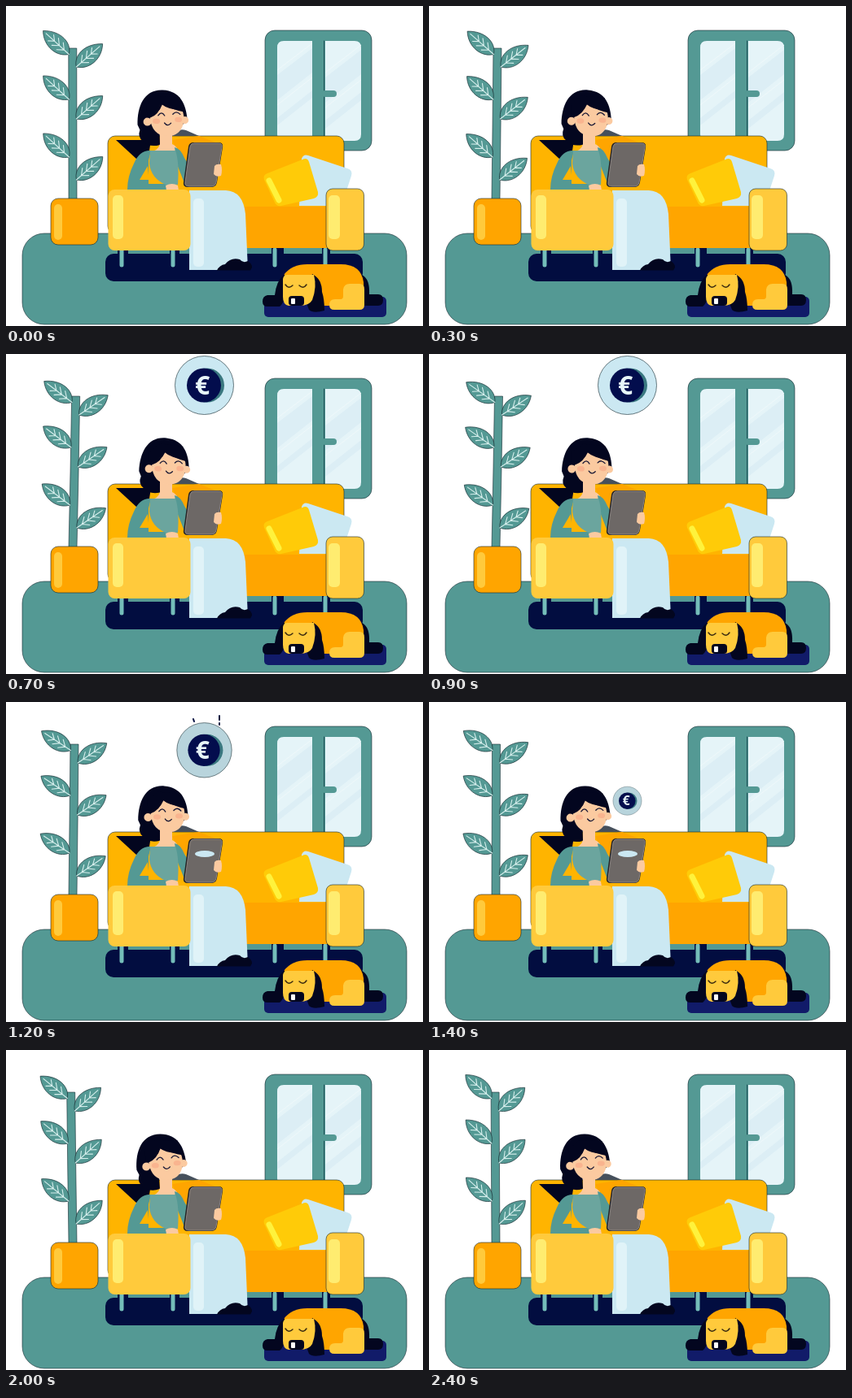
Recreate the animation shown at these times as an HTML page. Size 512 px wide and 394 px high, loop 2500 ms.

```html
<!DOCTYPE html>
<html lang="en">
<head>
<meta charset="utf-8">
<title>Sofa evening</title>
<style>
  html, body { margin: 0; width: 100%; height: 100%; overflow: hidden; background: #fff; }
  svg { display: block; width: 100vw; height: 100vh; }
  .teal { fill: #549994; }
  .navy { fill: #020d40; }
  .hair { fill: #03061f; }
  .ice { fill: #cbe8f2; }
  .skin { fill: #fbcaa0; }
  .amber { fill: #ffa500; }
  .gold { fill: #ffca3c; }
  .edge { stroke: #12282e; stroke-width: .6; }
  .line { fill: none; stroke-linecap: round; stroke-linejoin: round; }
</style>
</head>
<body>
<svg viewBox="0 0 512 394" xmlns="http://www.w3.org/2000/svg">
  <defs>
    <clipPath id="panes"><path d="M341 43H376V166H341Q333 166 333 158V51Q333 43 341 43ZM392 43H428Q436 43 436 51V158Q436 166 428 166H392Z"/></clipPath>
    <g id="leafShape">
      <path class="teal edge" d="M0 0C7 -13 27 -15 43 0C30 14 9 13 0 0Z"/>
      <path class="line" stroke="#d5eeec" stroke-width="1.1" d="M0 0H38M8 0L15 -6M8 0L15 6M16 0L23 -6M16 0L23 6M24 0L30 -5M24 0L30 5"/>
    </g>
  </defs>

  <rect class="teal edge" x="20" y="280" width="472" height="112" rx="27"/>

  <!-- window -->
  <rect class="teal edge" x="318" y="30" width="131" height="148" rx="12"/>
  <g clip-path="url(#panes)">
    <rect x="333" y="43" width="103" height="123" fill="#e5f4f8"/>
    <path fill="#dceef5" d="M333 85L376 52V82L333 116ZM333 138L376 104V113L333 147ZM392 88L436 54V84L392 119ZM392 141L436 106V116L392 151Z"/>
    <path class="line" stroke="#eff8fa" d="M333 79L376 46M333 122L376 88M392 82L436 48M392 125L436 91"/>
  </g>
  <path class="line" stroke="#1f5058" d="M390.5 43V160"/>
  <rect class="teal" x="388" y="104" width="18" height="8" rx="4"/>

  <!-- plant -->
  <path id="stalk" class="teal edge"/>
  <g id="leaves"></g>
  <rect class="amber edge" x="55" y="237" width="58" height="57" rx="9"/>
  <rect class="gold" x="59" y="244" width="10" height="44" rx="5"/>

  <!-- sofa -->
  <rect class="navy" x="122" y="305" width="316" height="34" rx="10"/>
  <path class="navy" d="M137 297H150V306H137ZM201 297H213V306H201ZM326 297H341V306H326ZM388 297H398V306H388Z"/>
  <path class="line" stroke="#74bdb9" stroke-width="5" d="M142 300V319M205 300V319M330 300V319M392 300V319"/>
  <rect class="edge" x="125" y="160" width="290" height="120" rx="9" fill="#ffb400"/>
  <path class="amber" d="M222 247H398V298H222Z"/>
  <path class="ice" d="M371 184L419 200Q426 202 424 209L412 246H360L363 188Q365 182 371 184Z"/>
  <path fill="#ffcb08" d="M321 206L364 189Q370 186 372 192L383 229Q384 235 378 237L338 246Q332 247 330 242L317 214Q315 208 321 206Z"/>
  <path class="line" stroke="#fff23c" stroke-width="7" d="M323 215L335 239"/>
  <rect class="gold edge" x="393" y="225" width="46.500" height="76" rx="8"/>
  <rect x="396" y="233" width="14" height="54" rx="5" fill="#ffec70"/>

  <!-- woman -->
  <path class="hair" d="M135 165H178L176 178L161 189Z"/>
  <path class="amber" d="M204 165L237 160L262 170L226 178L222 190L208 175Z"/>
  <path d="M202 160Q211 150 221 153L237 160Z" fill="#46505c"/>
  <g id="backHair"><path class="hair" d="M161 147C160 124 168 103 191 103.500C213 104 220 121 222 139L212 151L188 150L189 171Q176 175 168 167Q161 162 164 153Z"/></g>
  <path class="skin" d="M189 152H204V170Q210 172 211 180L195 188L176 180Q187 178 189 170Z"/>
  <path class="teal" d="M178 178Q164 177 157 194Q149 210 149 226H200L198 219H175V190ZM207 174Q214 175 219 187L227 200L219 218L210 195Z"/>
  <path fill="#6ba59e" d="M177 178H208Q213 192 211 220H196Q178 212 176 194Z"/>
  <path fill="#ffb400" d="M174 197L164 214H175.500Z"/>
  <path class="skin" d="M196 221Q204 217 211 221L212 227H197Z"/>
  <g id="head">
    <circle class="skin" cx="173" cy="143" r="5"/>
    <circle class="skin" cx="219" cy="140" r="4.500"/>
    <path class="skin" d="M176 138Q187 134 190 121Q199 128 215 127Q219 134 217 145Q213 160 198 160Q179 160 176 138Z"/>
    <path class="hair" d="M173 138Q187 133 191 121Q205 128 218 130L212 112L184 111L171 122Z"/>
    <ellipse cx="184" cy="142" rx="4.500" ry="3.200" fill="#f9b48f"/>
    <ellipse cx="211" cy="139.500" rx="4.500" ry="3.200" fill="#f9b48f"/>
    <path class="line" stroke="#161634" stroke-width="1.3" d="M186 135Q190 129 194 135M204 133Q208 128 213 133M194 144Q198 149 202 144"/>
  </g>
  <path d="M230 168H261Q267 168 266 174L259 217Q258 223 252 223H223Q217 223 218 217L224 173Q225 168 230 168Z" fill="#252426"/>
  <path d="M231 169H261Q266 169 265 174L258 217Q257 222 252 222H225Q219 222 220 217L226 173Q227 169 231 169Z" fill="#6d6866" stroke="#8c8583"/>
  <ellipse id="slot" cx="244" cy="187" ry="4" class="ice"/>
  <path class="skin" d="M256 197Q258 194 264 195Q266 202 264 209Q258 211 255 207Z"/>
  <path class="ice" d="M225 227H270Q291 228 294 256L297 325H225Z"/>
  <rect x="230" y="237" width="13" height="84" rx="5" fill="#e0f3f8"/>
  <path class="hair" d="M259 325.500Q262 319 269 318Q276 309 287 312Q291 317 297 314Q302 317 302 322L300 325.500Z"/>
  <rect class="gold" x="125.500" y="226" width="101" height="75" rx="8"/>
  <rect x="131" y="233" width="13" height="54" rx="5" fill="#ffec70"/>

  <!-- dog -->
  <rect x="317" y="358" width="150" height="25" rx="5" fill="#111b69"/>
  <path class="hair" d="M437 331Q447 336 446 355H457Q463 355 463 362Q463 369 457 369H438Z"/>
  <path class="amber" d="M341 331Q351 318 370 318H411Q436 318 439 340L440 369H376Z"/>
  <path class="hair" d="M342 330Q332 338 330 356H321Q315 357 315 364Q315 370 321 370H336Q341 366 342 358ZM376 330Q388 336 388 352Q391 361 391 375Q377 379 372 374L368 363Z"/>
  <path class="gold" d="M345 331H378Q382 346 376 362Q372 369 361 369H347Q340 368 340 358V336Q341 331 345 331Z"/>
  <path class="gold" d="M414 349Q415 342 422 342H434Q440 342 440 349V368Q440 374 434 374H403Q397 374 397 368Q397 361 404 361H411Q414 361 414 357Z"/>
  <rect class="hair" x="347" y="357" width="19" height="12" rx="4"/>
  <rect x="350" y="360" width="5" height="7" rx="1" fill="#fff"/>
  <path class="line" stroke="#3a2a10" stroke-width="1.500" d="M343 343Q347 349 352 344M360 344Q365 349 369 343"/>

  <!-- coin -->
  <path id="ticks" class="line" stroke="#020d40" stroke-width="2" d="M230 21L231 24M262 17V22M262 26V28"/>
  <g id="coin">
    <circle id="halo" class="edge"/>
    <g id="disc">
      <circle cx="3.500" r="21" fill="#3a7880"/>
      <circle r="21" cx="-.5" fill="#030d4d"/>
      <text x="-2.500" y="11.500" text-anchor="middle" font-family="'Open Sans', Lato, sans-serif" font-weight="700" font-size="32" fill="#e8f6f9">€</text>
    </g>
  </g>
</svg>
<script>
const LOOP = 2500, STEP = 100;
const $ = id => document.getElementById(id);
const set = (node, attrs) => { for (const k in attrs) node.setAttribute(k, attrs[k]); };
const show = (node, on) => set(node, { visibility: on ? "visible" : "hidden" });

// Progress from 0 to 1 between two times.
const ramp = (t, from, to) => Math.min(1, Math.max(0, (t - from) / (to - from)));
const smooth = u => u * u * (3 - 2 * u);
// One swing per loop, 1 at the peak time.
const swing = (t, peak) => Math.cos(2 * Math.PI * (t - peak) / LOOP);

function makeLeaf(side, y) {
  const node = document.createElementNS("http://www.w3.org/2000/svg", "use");
  set(node, { href: "#leafShape" });
  $("leaves").append(node);
  return { node, side, y };
}
const leaves = [
  ...[59.5, 115, 186].map(y => makeLeaf(-1, y)),
  ...[75, 139, 214].map(y => makeLeaf(1, y))
];

function drawPlant(t) {
  const lean = .7 + 3 * swing(t, 750);
  const bend = y => lean * (237 - y) / 185;
  $("stalk").setAttribute("d",
    `M77 238Q${77 + lean * .6} 145 ${77 + lean} 52H${87 + lean}Q${87 + lean * .6} 145 87 238Z`);
  for (const { node, side, y } of leaves) {
    const droop = 4.5 * swing(t, side < 0 ? 1250 : 950);
    set(node, {
      transform: `translate(${82 + side * 4.5 + bend(y)} ${y}) scale(${side} 1) rotate(${droop - 38})`
    });
  }
}

function drawCoin(t) {
  const pop = 1 - (1 - ramp(t, 300, 700)) ** 2;
  const fall = ramp(t, 1000, 1500);
  const shrink = 1 - fall ** 3;
  const dim = ramp(t, 1000, 1200);
  show($("coin"), pop > 0 && fall < 1);
  set($("coin"), { transform: `translate(243.5 ${38.5 + 130 * fall ** 2}) scale(${shrink})` });
  set($("halo"), {
    r: 36 * smooth(ramp(t, 400, 600)),
    fill: `rgb(${203 - 19 * dim} ${232 - 20 * dim} ${242 - 22 * dim})`
  });
  set($("disc"), { transform: `scale(${pop})` });
  show($("ticks"), t >= 1100 && t < 1300);

  const open = ramp(t, 1000, 1200) - ramp(t, 1600, 1800);
  show($("slot"), open > 0);
  set($("slot"), { rx: 12 * open });
}

function draw(t) {
  const turn = `rotate(${1.8 + 3.2 * swing(t, 700)} 194 172)`;
  set($("head"), { transform: turn });
  set($("backHair"), { transform: turn });
  drawPlant(t);
  drawCoin(t);
}

const start = performance.now();
function tick() {
  const elapsed = (performance.now() - start) % LOOP;
  draw(Math.floor(elapsed / STEP) * STEP);
  requestAnimationFrame(tick);
}
tick();
</script>
</body>
</html>
```
